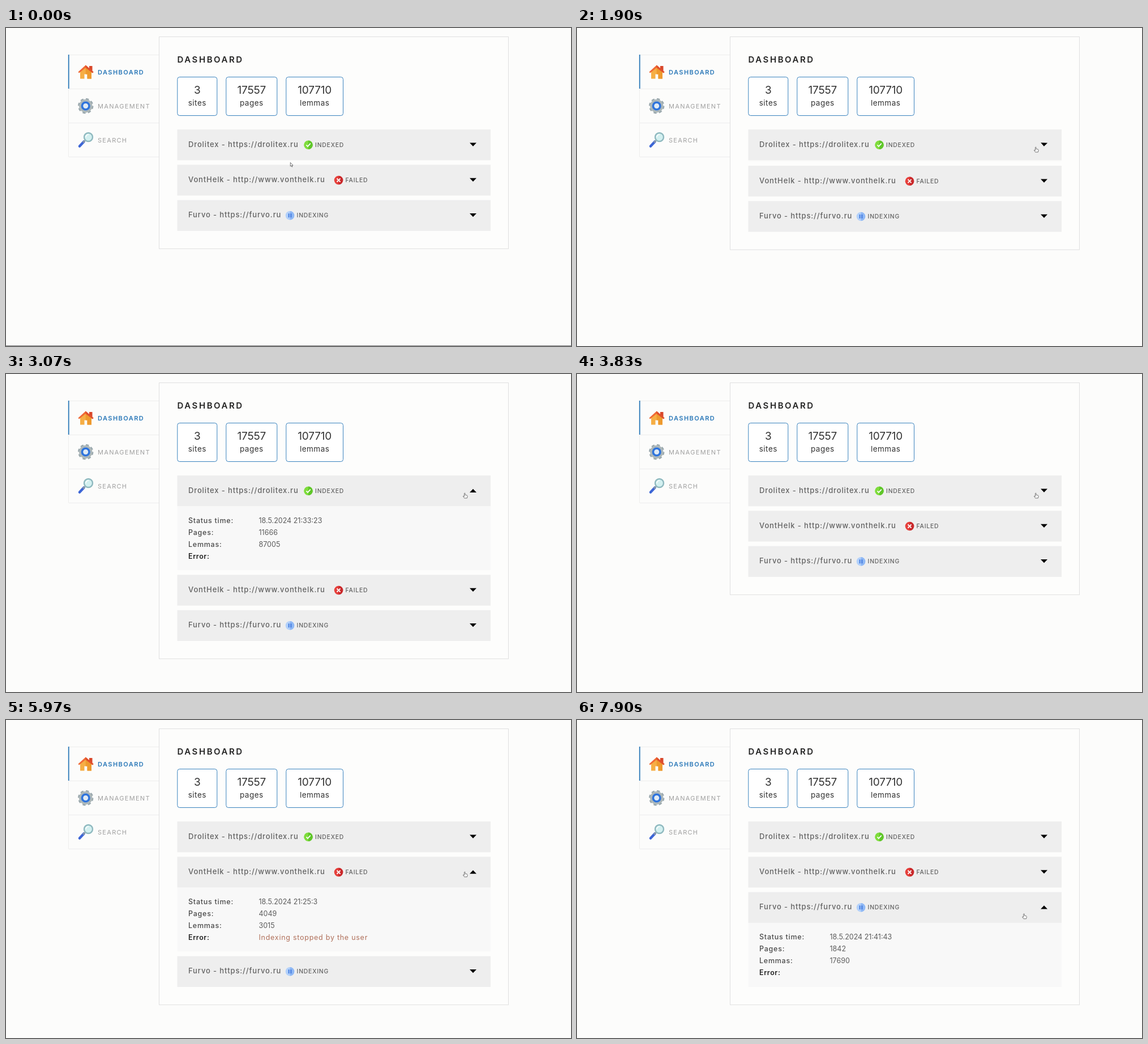
These frames come from a looping animation (998 by 561 pixels, 8000 ms). An HTML page:

```html
<!DOCTYPE html>
<html lang="en">
<head>
<meta charset="utf-8">
<title>Dashboard</title>
<style>
html, body { margin: 0; width: 100%; height: 100%; overflow: hidden; background: #fcfcfb; }
svg { font-family: Inter, "Open Sans", sans-serif; }
#stage { display: block; width: 100vw; height: 100vh; }
.head { font-size: 15px; font-weight: 600; letter-spacing: 2.55px; fill: #222; }
.nav { font-size: 11px; letter-spacing: 1.3px; fill: #a0a0a0; }
.nav.on { font-weight: 600; letter-spacing: 1.45px; fill: #2a78b8; }
.stat { text-anchor: middle; fill: #333; }
.num { font-size: 19px; letter-spacing: -.2px; }
.unit { font-size: 13.5px; letter-spacing: .5px; }
.title { font-size: 13px; font-weight: 500; letter-spacing: .87px; fill: #626262; }
.state { font-size: 10.4px; font-weight: 500; letter-spacing: .8px; fill: #626262; }
.label { font-size: 12.5px; font-weight: 500; letter-spacing: .75px; fill: #4a4a4a; }
.label.strong { font-weight: 600; letter-spacing: .6px; fill: #222; }
.value { font-size: 12.5px; fill: #5c5c5c; }
.error { font-size: 12.5px; letter-spacing: .74px; fill: #b0705b; }
</style>
</head>
<body>
<svg id="stage" viewBox="0 0 998 561">
  <rect id="panel" x="270.5" y="15.5" width="617" height="374" fill="#fdfdfc" stroke="#e0e0e0"/>
  <path d="M110.5 47.5H270M110.5 107.5H270M110.5 167.5H270M110.5 227.5H270M110.5 107V227" fill="none" stroke="#ededed"/>
  <path d="M110.7 47V107" stroke="#2a78b8" stroke-width="1.8"/>

  <g id="house">
    <path d="M147 67h5.500v9h-5.500z" fill="#d9482b"/>
    <path d="M131 77L140.700 69L151 77V89.500H143.500V81.500H138.500V89.500H131z" fill="#f6ae45"/>
    <path d="M140.700 69L151 77V89.500H143.500V81.500H140.700z" fill="#ee9a2e"/>
    <path d="M127.500 77.500L140.700 65.500L154.500 77.500L153 79.500L140.700 70L129 79.500z" fill="#f06a35"/>
    <path d="M140.700 65.500L154.500 77.500L153 79.500L140.700 70z" fill="#df4f2c"/>
  </g>
  <g id="gear" fill="none">
    <circle cx="140.700" cy="137.500" r="12.300" stroke="#98a6ab" stroke-width="2.800" stroke-dasharray="5.300 4.360"/>
    <circle cx="140.700" cy="137.500" r="9.700" stroke="#adb8ba" stroke-width="4"/>
    <circle cx="140.700" cy="137.500" r="6.300" fill="#dfeaf5" stroke="#2f74dc" stroke-width="3.600"/>
  </g>
  <g id="lens">
    <path d="M137.500 200.500L130 208.500" stroke="#3d66d6" stroke-width="4.600" stroke-linecap="round"/>
    <path d="M136 202L139.500 198.500" stroke="#8d9aa5" stroke-width="2.600"/>
    <circle cx="145.500" cy="192.500" r="7.500" fill="#d3f0f0" stroke="#8fb9bf" stroke-width="2.400"/>
    <path d="M141 193a4.600 4.600 0 0 1 5-5" fill="none" stroke="#fff" stroke-width="1.500"/>
  </g>

  <g id="texts"></g>
  <g id="rows"></g>
  <rect id="edge" y="560" width="998" height="1" fill="#777"/>
  <g id="arrow" fill="#fff" stroke="#555" stroke-width=".8">
    <path d="M0 0V6.700L1.600 5.300L2.700 7.800L3.700 7.300L2.700 5H4.700z"/>
  </g>
  <g id="hand" fill="#fff" stroke="#555" stroke-width=".8" stroke-linejoin="round">
    <path d="M-.8 .6Q0 -.6 .8 .6V3.400L4 4.100Q5 4.500 4.800 6L4 9H-.6L-3 5.700Q-2.600 4.700 -.8 6z"/>
  </g>
</svg>
<script>
const $ = id => document.getElementById(id);
const text = (cls, x, y, s) => `<text class="${cls}" x="${x}" y="${y}">${s}</text>`;

const TOP = 179, PITCH = 62.3, HEAD = 54.3, OPEN = 113, DURATION = 215;

const stats = [[302.8, 70, 3, 'sites'], [388.8, 90, 17557, 'pages'], [494.8, 100.7, 107710, 'lemmas']];
$('texts').innerHTML =
  text('head', 302.5, 61.2, 'DASHBOARD') +
  text('nav on', 162, 81.6, 'DASHBOARD') +
  text('nav', 162, 141.6, 'MANAGEMENT') +
  text('nav', 162, 201.6, 'SEARCH') +
  stats.map(([x, w, n, unit]) =>
    `<rect x="${x}" y="86.500" width="${w}" height="68" rx="4" fill="#fff" stroke="#3a83be"/>` +
    text('stat num', x + w / 2, 116.2, n) + text('stat unit', x + w / 2, 136.5, unit)).join('');

// start: when the easing begins; from: first moment it is visible; to: when it closes
const sites = [
  { name: 'Drolitex - https://drolitex.ru', state: 'INDEXED', x: 534, colors: ['#7fdc3c', '#5fc62a'],
    mark: 'M-3.500 .2L-1 2.800L3.700 -2.600', ink: '#fff',
    info: ['18.5.2024 21:33:23', 11666, 87005, ''], start: 1895, from: 1895, to: 3830 },
  { name: 'VontHelk - http://www.vonthelk.ru', state: 'FAILED', x: 587.5, colors: ['#e6403c', '#c92a2c'],
    mark: 'M-3 -3L3 3M3 -3L-3 3', ink: '#fff',
    info: ['18.5.2024 21:25:3', 4049, 3015, 'Indexing stopped by the user'], start: 4520, from: 4670, to: 6830 },
  { name: 'Furvo - https://furvo.ru', state: 'INDEXING', x: 501.5, colors: ['#b3d1fa', '#8fb8f5'],
    mark: 'M-1.900 -3.500V3.500M1.900 -3.500V3.500', ink: '#3a74dc',
    info: ['18.5.2024 21:41:43', 1842, 17690, ''], start: 7680, from: 7800, to: 8000 },
];

$('rows').innerHTML = sites.map(s => `<g>
  <rect x="302.500" width="553.500" height="${HEAD}" fill="#eee"/>
  ${text('title', 322, 30.6, s.name)}
  <g transform="translate(${s.x} 27.200)">
    <circle r="7.800" fill="${s.colors[0]}"/>
    <path d="M0 -7.800A7.800 7.800 0 0 1 0 7.800z" fill="${s.colors[1]}"/>
    <path d="${s.mark}" fill="none" stroke="${s.ink}" stroke-width="1.800"/>
  </g>
  ${text('state', s.x + 12, 30.9, s.state)}
  <path class="caret" d="M819 23.500H831L825 29.700z"/>
  <svg class="body" x="302.500" y="${HEAD}" width="553.500" height="0" overflow="hidden">
    <rect width="100%" height="100%" fill="#f8f8f8"/>
    <g>${['Status time:', 'Pages:', 'Lemmas:', 'Error:'].map((label, i) =>
      text(i < 3 ? 'label' : 'label strong', 19.5, 21.1 * i, label) +
      text(i < 3 ? 'value' : 'error', 144, 21.1 * i, s.info[i])).join('')}</g>
  </svg></g>`).join('');

const rows = [...$('rows').children].map(g =>
  ({ g, caret: g.querySelector('.caret'), body: g.querySelector('.body'), info: g.querySelector('.body g') }));

// cubic-bezier(.25, .1, .25, 1), solved by bisection
const bez = (u, a, b) => 3 * u * (1 - u) * (1 - u) * a + 3 * u * u * (1 - u) * b + u * u * u;
function ease(x) {
  if (x <= 0) return 0;
  if (x >= 1) return 1;
  let lo = 0, hi = 1;
  for (let i = 0; i < 20; i++) {
    const mid = (lo + hi) / 2;
    if (bez(mid, .25, .25) < x) lo = mid; else hi = mid;
  }
  return bez(lo, .1, 1);
}

// pointer moves: begin, end, x, y
const moves = [[1000, 1600, 810.3, 210], [3870, 4300, 813, 267.3], [4670, 4800, 810.3, 267.8], [6830, 7170, 789.5, 341.7]];
function pointer(t) {
  let x = 502.3, y = 237.3;
  for (const [a, b, nx, ny] of moves) {
    const k = Math.min(1, Math.max(0, (t - a) / (b - a))), p = k * k * (3 - 2 * k);
    x += (nx - x) * p;
    y += (ny - y) * p;
  }
  return [x, y];
}

function draw(t) {
  const [px, py] = pointer(t);
  let y = TOP, over = false;
  sites.forEach((s, i) => {
    const p = t >= s.from && t < s.to ? ease((t - s.start) / DURATION) : 0;
    const h = OPEN * p, r = rows[i];
    r.g.setAttribute('transform', `translate(0 ${y})`);
    r.caret.setAttribute('transform', `rotate(${180 * p} 825 26.700)`);
    r.body.setAttribute('height', h);
    r.body.style.display = h ? '' : 'none';
    r.info.setAttribute('transform', `translate(0 ${Math.max(13, 29.3 - (OPEN - h) * .27)})`);
    over = over || (py >= y && py < y + HEAD);
    y += PITCH + h;
  });
  $('panel').setAttribute('height', y + 8);
  $('edge').style.display = t < 1800 ? '' : 'none';
  for (const [id, shown] of [['hand', over], ['arrow', !over]]) {
    $(id).setAttribute('transform', `translate(${px} ${py})`);
    $(id).style.display = shown ? '' : 'none';
  }
}

const begin = performance.now();
function tick() {
  draw((performance.now() - begin) % 8000);
  requestAnimationFrame(tick);
}
tick();
</script>
</body>
</html>
```
